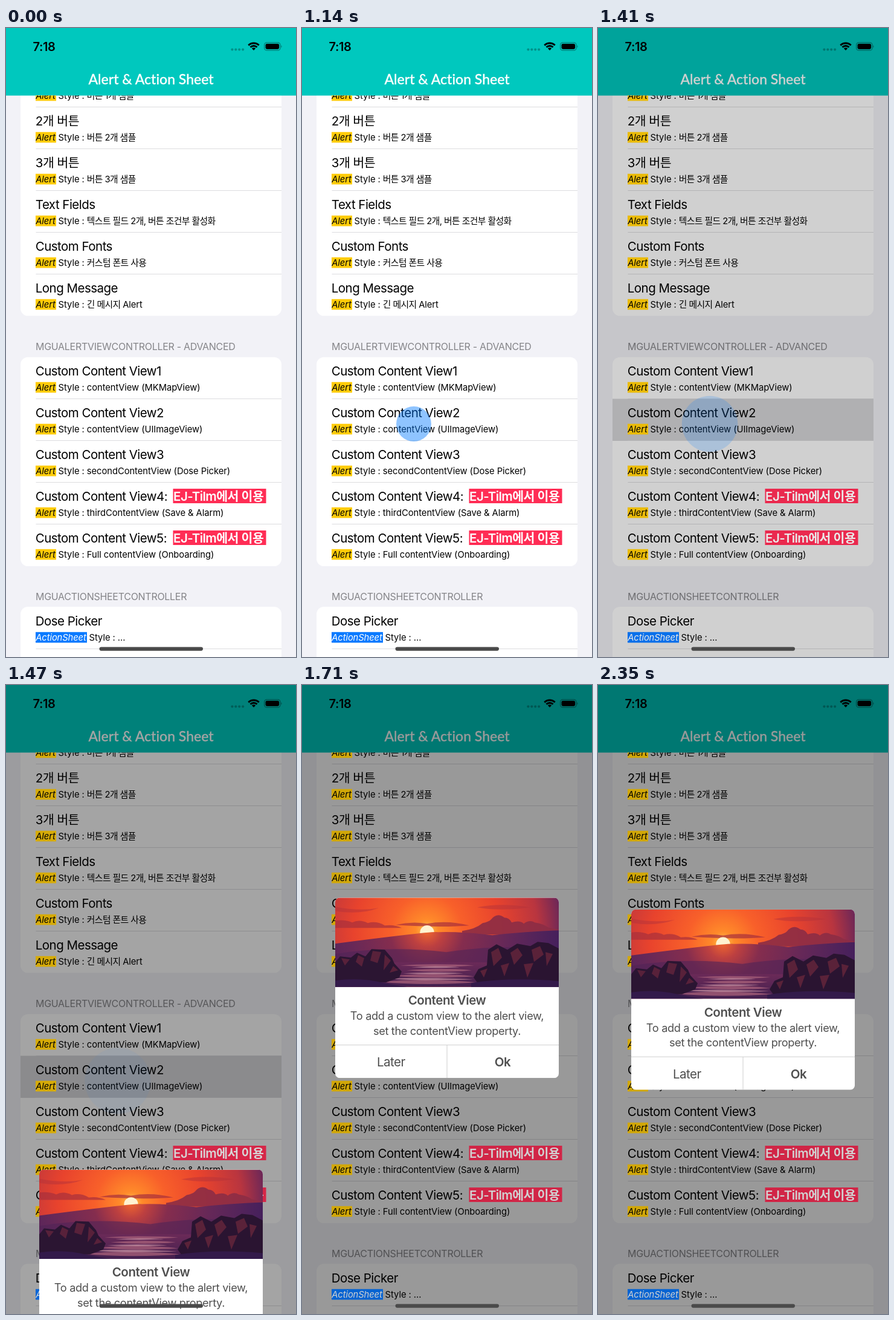
These frames come from a looping animation (480x1039 px, 2.41 s). An HTML page:

```html
<!DOCTYPE html>
<html lang="ko">
<head>
<meta charset="utf-8">
<title>Alert &amp; Action Sheet</title>
<style>
  html, body { margin: 0; width: 100%; height: 100%; overflow: hidden; background: #f2f2f7; }
  svg { display: block; width: 100vw; height: 100vh; }
  text { font-family: Inter, "Noto Sans CJK KR", "Noto Sans CJK", sans-serif; font-optical-sizing: none; white-space: pre; }
  .title { font-size: 20.5px; letter-spacing: -.53px; }
  .sub { font-size: 14.77px; letter-spacing: -.06px; }
  .ko { letter-spacing: -.55px; }
  .tag { font-style: italic; letter-spacing: -.12px; }
  .head { font-size: 16px; letter-spacing: -.29px; fill: #858589; }
  .nav { font: 500 23px Lato, sans-serif; font-variant-ligatures: none; fill: #fff; stroke: #fff; stroke-width: .3px; }
  .time { font-size: 20px; letter-spacing: -.4px; }
  .msg { font-size: 18.2px; letter-spacing: -.35px; }
  .bold { font-weight: 600; }
  .mid { text-anchor: middle; }
  #alert text { fill: #4f4f4f; }
</style>
</head>
<body>
<svg viewBox="0 0 480 1039" preserveAspectRatio="none">
  <defs>
    <clipPath id="below"><rect y="111.6" width="480" height="928"/></clipPath>
    <clipPath id="round"><rect width="370" height="298" rx="7.5"/></clipPath>
    <clipPath id="pic"><rect width="370" height="147.5"/></clipPath>
    <radialGradient id="sky" gradientUnits="userSpaceOnUse" cx="152" cy="55" r="235">
      <stop stop-color="#ffc24c"/><stop offset=".08" stop-color="#ff8a2a"/>
      <stop offset=".25" stop-color="#f8602a"/><stop offset=".52" stop-color="#e8432d"/>
      <stop offset=".78" stop-color="#b9353f"/><stop offset="1" stop-color="#55235f"/>
    </radialGradient>
    <radialGradient id="hill" gradientUnits="userSpaceOnUse" cx="152" cy="55" r="220">
      <stop stop-color="#f0662f"/><stop offset=".12" stop-color="#bd4040"/>
      <stop offset=".28" stop-color="#852d4e"/><stop offset=".6" stop-color="#652858"/>
      <stop offset="1" stop-color="#45205c"/>
    </radialGradient>
    <linearGradient id="sea" x2="0" y2="1">
      <stop stop-color="#6b2a58"/><stop offset="1" stop-color="#43204f"/>
    </linearGradient>
  </defs>

  <rect width="480" height="1039" fill="#f2f2f7"/>
  <g id="cards" fill="#fff"></g>
  <rect id="row" x="24" y="612.5" width="432" height="69.5" fill="#d8d8da"/>
  <g id="lines" stroke="#dcdcdf"></g>
  <text class="head" x="49" y="531.5">MGUALERTVIEWCONTROLLER - ADVANCED</text>
  <text class="head" x="49" y="944.5">MGUACTIONSHEETCONTROLLER</text>
  <rect width="480" height="111.6" fill="#00c8be"/>
  <text class="nav mid" x="240" y="92.5">Alert &amp; Action Sheet</text>
  <rect id="dim" width="480" height="1039"/>

  <g clip-path="url(#below)">
    <g id="tags"></g>
    <g id="labels"></g>
  </g>

  <text class="time bold" x="44.5" y="38">7:18</text>
  <g id="dots" fill-opacity=".27"></g>
  <g fill="none" stroke="#000" stroke-width="2.9">
    <path d="M401.3 28.6a12.3 12.3 0 0 1 17.4 0M404.5 31.8a7.8 7.8 0 0 1 11 0"/>
    <path d="M410 37l-3.1-3.2a4.4 4.4 0 0 1 6.2 0z" fill="#000" stroke="none"/>
    <rect x="427.6" y="24.1" width="26.4" height="12.8" rx="4" stroke-width="1.2" stroke-opacity=".38"/>
  </g>
  <rect x="429.5" y="26" width="22.6" height="9" rx="2.4"/>
  <path d="M455.4 28.2q2.2 2.3 0 4.6z" fill-opacity=".4"/>

  <g id="alert" clip-path="url(#round)">
    <rect width="370" height="298" fill="#fff"/>
    <g clip-path="url(#pic)">
      <rect width="370" height="148" fill="url(#sky)"/>
      <path fill="#a8303d" d="M0 38q16-2 28 3 12-6 26 1 14-4 28 4 16-2 28 4H0zM100 45q26-6 52-2 34-6 70 3-50 4-122-1z" opacity=".7"/>
      <path fill="#8c2d45" d="M210 55q22-3 34-13 10-2 14-6 10-12 22-3 8 0 12 8 14-4 20 2 10-7 18-2 14 2 22 8l18 4v8H210z" opacity=".9"/>
      <path fill="#b5333a" d="M0 15q40 8 72 2-32 12-72 5zM235 16q40-8 88 0-50 7-88 0z" opacity=".5"/>
      <circle cx="152" cy="57.5" r="11.7" fill="#fff3d0"/>
      <path fill="url(#hill)" d="M0 76Q60 68 112 62T170 57q45-1 90 5 55-6 110-8v60H0z"/>
      <path fill="#512358" d="M0 93q90-14 184-3 90-14 186-4v36H0z" opacity=".6"/>
      <rect y="107" width="370" height="41" fill="url(#sea)"/>
      <path fill="#a8607a" d="M108 112q50-4 122 0-40 4-122 0zM118 120q60-5 108 0-50 5-108 0zM96 129q70-6 134 1-70 5-134-1zM74 139q80-7 160 1-90 6-160-1z" opacity=".75"/>
      <path fill="#cf98a6" d="M126 115q40-3 80 0-40 2-80 0zM112 125q50-3 100 0-50 3-100 0zM88 134q60-3 140 1-80 3-140-1z" opacity=".7"/>
      <path fill="#2b1532" d="M0 107l8-10 18 2 10-8 14 6 10-12 22 1 12 14 4 9 12 13-4 10-22 8H0z"/>
      <path fill="#58213a" d="M10 100l14 2-8 10zM38 95l10 5-4 14-10-8zM62 88l14 2-6 18-12-4zM82 94l10 10-12 16zM96 113l8 7-14 4z"/>
      <path fill="#2a1431" d="M229 132l8-14 14-6 2-26 14-9 18 9 16-10 22 4 12-7 18 2 17 9v60H238z"/>
      <path fill="#5a2239" d="M258 90l12-7 6 16-14 14zM290 91l12-8 8 12-14 16zM325 86l14-6 6 14-16 12zM240 121l12-4-6 15zM274 112l14-4-8 22zM312 110l16-2-10 24zM348 90l12 3-10 20z"/>
      <path fill="#331a4a" d="M0 137q42-6 80 4l40 7H0zM225 141q66-10 145-3v12H225z"/>
    </g>
    <text class="title bold mid" x="185" y="177" style="letter-spacing:-.4px">Content View</text>
    <text class="msg mid" x="185" y="202">To add a custom view to the alert view,</text>
    <text class="msg mid" x="185" y="226.7">set the contentView property.</text>
    <path d="M0 243.5H370M185 243.5V298" stroke="#cfcfcf"/>
    <text class="title mid" x="92.3" y="279">Later</text>
    <text class="title bold mid" x="277" y="279">Ok</text>
  </g>

  <rect x="154.5" y="1022.5" width="171.5" height="6.2" rx="3.1" fill="#4a4a4a"/>
  <circle id="touch" cx="185" cy="654" fill="#007aff"/>
</svg>

<script>
const $ = id => document.getElementById(id);

function add(parent, name, attrs, text = '') {
  const el = document.createElementNS('http://www.w3.org/2000/svg', name);
  for (const key in attrs) el.setAttribute(key, attrs[key]);
  el.textContent = text;
  parent.append(el);
  return el;
}

const [cards, lines, tags, labels] = ['cards', 'lines', 'tags', 'labels'].map($);
const ROW = 69;
const BADGE = 'EJ-Tilm에서 이용';

// Each section: card top, card height, first row top, rows of [title, detail, badge]
const sections = [
  [60, 415.5, 61.5, [
    ['1개 버튼', '버튼 1개 샘플'],
    ['2개 버튼', '버튼 2개 샘플'],
    ['3개 버튼', '버튼 3개 샘플'],
    ['Text Fields', '텍스트 필드 2개, 버튼 조건부 활성화'],
    ['Custom Fonts', '커스텀 폰트 사용'],
    ['Long Message', '긴 메시지 Alert']
  ]],
  [543.7, 345.3, 543.5, [
    ['Custom Content View1', 'contentView (MKMapView)'],
    ['Custom Content View2', 'contentView (UIImageView)'],
    ['Custom Content View3', 'secondContentView (Dose Picker)'],
    ['Custom Content View4:', 'thirdContentView (Save & Alarm)', BADGE],
    ['Custom Content View5:', 'Full contentView (Onboarding)', BADGE]
  ]],
  [956, 120, 956.5, [['Dose Picker', '...']]]
];

function drawRow(y, [title, detail, badge], sheet) {
  const width = sheet ? 85 : 34;
  add(labels, 'text', { class: 'title', x: 48.8, y: y + 30.3 }, title);
  add(tags, 'rect', { x: 49, y: y + 41.3, width, height: 17.6, fill: sheet ? '#0a7aff' : '#ffcc0a' });
  add(tags, 'text', { class: 'sub tag', x: 49.3, y: y + 55.4, fill: sheet ? '#fff' : '#000' },
    sheet ? 'ActionSheet' : 'Alert');
  const sub = add(labels, 'text', { class: 'sub', x: 52.6 + width, y: y + 55.4 }, 'Style : ');
  for (const part of detail.match(/.*[가-힣]\s?|.+$/g))
    add(sub, 'tspan', { class: /[가-힣]/.test(part) ? 'ko' : '' }, part);
  if (badge) {
    add(tags, 'rect', { x: 276.5, y: y + 10.5, width: 154, height: 24, fill: '#ff2d55' });
    add(tags, 'text', { class: 'title bold', x: 277, y: y + 30.3, fill: '#fff' }, badge);
  }
}

sections.forEach(([top, height, first, rows], s) => {
  const sheet = s === 2;
  add(cards, 'rect', { x: 24, y: top, width: 432, height, rx: 12.3 });
  rows.forEach((row, i) => {
    const y = first + i * ROW;
    drawRow(y, row, sheet);
    if (sheet || i < rows.length - 1) add(lines, 'path', { d: `M49.5 ${y + ROW}H456` });
  });
});

for (let i = 0; i < 4; i++) add($('dots'), 'circle', { cx: 374.4 + i * 5.9, cy: 35.6, r: 2.1 });

const LOOP = 2410, TOUCH = 1140, RELEASE = 1270, DIM = 1307, RISE = 1407, DESELECT = 1550;
const TICK = 100 / 3;
const ramp = (t, from, length) => Math.min(1, Math.max(0, (t - from) / length));
const smooth = p => p * p * (3 - 2 * p);

// Underdamped spring, 1 at rest position to 0 at target
function spring(ms) {
  if (ms <= 0) return 1;
  const a = ms * .01145, k = 1.1;
  return Math.exp(-k * a) * (Math.cos(a) + k * Math.sin(a));
}

function draw(time) {
  // The picture advances at 30 steps per second
  const t = TOUCH + Math.floor((time - TOUCH) / TICK + .15) * TICK;

  const fade = ramp(t, RELEASE, 230);
  $('touch').setAttribute('r', 29 * (1 + fade));
  $('touch').setAttribute('opacity', t < TOUCH ? 0 : .44 * (1 - fade));

  $('row').setAttribute('opacity', t < RELEASE ? 0 : 1 - ramp(t, DESELECT, 90));

  const dim = .4 * smooth(ramp(t, DIM, 210));
  $('dim').setAttribute('opacity', dim);
  tags.style.filter = dim ? `brightness(${1 - .45 * dim})` : 'none';

  const y = 370.7 + 668.3 * spring(t - RISE);
  $('alert').setAttribute('transform', `translate(55 ${y.toFixed(2)})`);
  $('alert').setAttribute('visibility', t > RISE ? 'visible' : 'hidden');
}

const start = performance.now();
function loop() {
  draw((performance.now() - start) % LOOP);
  requestAnimationFrame(loop);
}
loop();
</script>
</body>
</html>
```
